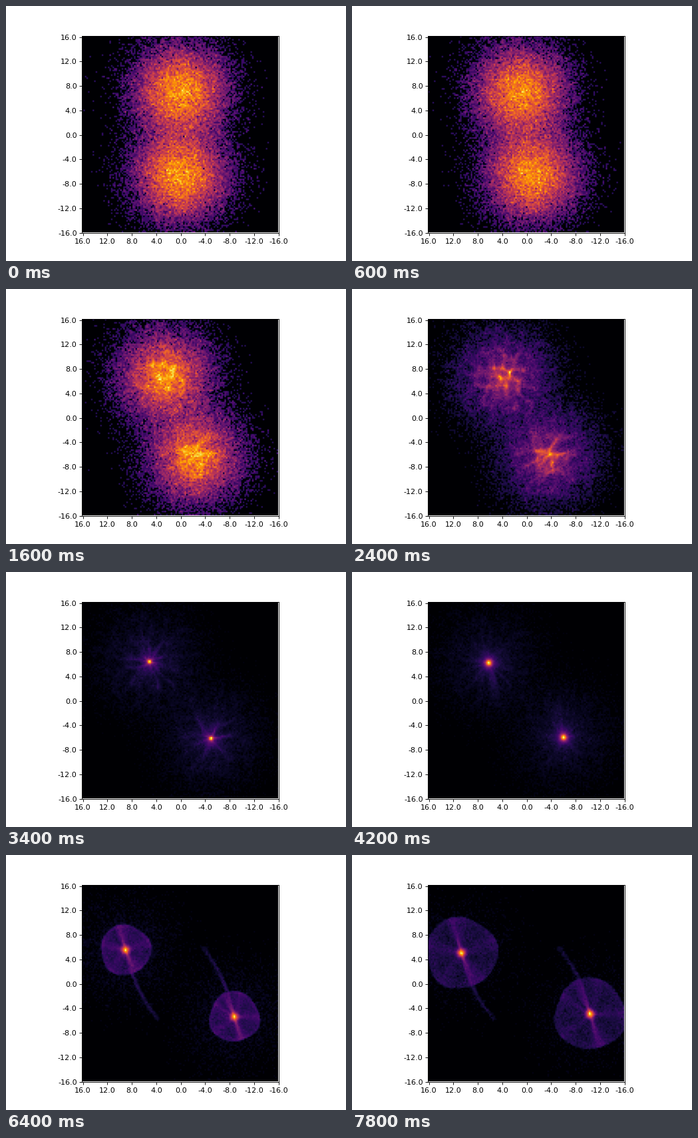
A matplotlib script for the animation above (8 s loop, 511 px wide and 383 px high).

```python
import numpy as np
import matplotlib.pyplot as plt
from matplotlib.animation import FuncAnimation

W, H, DPI = 511, 383, 80
FRAMES, STEP = 40, 200
CELLS, HALF = 128, 16.0
CELL = 2 * HALF / CELLS
COUNT = 25000
CORE, DISC, EDGE, BAR, STREAM = range(5)


def smooth(t, a, b):
    u = np.clip((t - a) / (b - a), 0, 1)
    return u * u * (3 - 2 * u)


class Cloud:
    """Gaussian cloud that falls in on itself and rebounds as a disc."""

    def __init__(self, seed, sign, scale, drift):
        rng = np.random.default_rng(seed)
        self.sign, self.scale, self.drift = sign, scale, drift
        self.q = rng.normal(0, 3.9, (COUNT, 2))
        r0 = np.hypot(*self.q.T)
        self.fall = 2.9 + 0.18 * r0 + 0.09 * np.maximum(r0 - 2.5, 0) ** 2

        # Small waves that gather the particles into filaments
        self.web = np.zeros((COUNT, 2))
        for _ in range(12):
            angle, phase = rng.uniform(0, 2 * np.pi, 2)
            k = 2 * np.pi / rng.uniform(1.5, 4.0)
            n = np.array([np.cos(angle), np.sin(angle)])
            self.web += 0.19 / k * np.sin(k * self.q @ n + phase)[:, None] * n
        self.web *= np.exp(-r0 ** 2 / 80)[:, None]
        self.phase = rng.uniform(0, 2 * np.pi)
        self.wave = self.phase + 0.7 * np.sin(r0)
        self.spoke = (rng.random(COUNT) < 0.4) * np.exp(-(r0 / 7) ** 4)

        self.kind = rng.choice(5, COUNT, p=[0.23, 0.51, 0.08, 0.125, 0.055])
        self.noise = rng.normal(0, 1, (COUNT, 2))
        self.u = rng.random(COUNT)
        self.reach = np.sqrt(self.u)
        self.edge = self.kind == EDGE
        bar = self.kind == BAR
        self.reach[bar] = self.u[bar]
        theta = rng.uniform(-np.pi, np.pi, COUNT)
        theta += 0.07 * np.sin(5 * theta + self.phase)
        arms = np.radians([106, -67, 176, 3])
        arm = rng.choice(arms, COUNT, p=[0.45, 0.45, 0.05, 0.05])
        theta[bar] = (arm + 0.1 * self.noise[:, 0])[bar]
        self.dir = np.stack([np.cos(theta), np.sin(theta)], 1)
        self.rim = (1 + 0.04 * np.sin(3 * theta + self.phase)
                    + 0.015 * np.sin(5 * theta))

    def centre(self, t):
        y0, a, b = self.drift
        x = self.scale * (1.6 * t - 0.03 * t * t)
        return np.array([-x, y0 - a * t - b * t * t])

    def infall(self, t):
        q = self.q + min((t / 2.4) ** 2.5, 1.5) * self.web
        r, th = np.hypot(*q.T), np.arctan2(q[:, 1], q[:, 0])
        pull = 0.92 * smooth(t, 1.8, 3.4) * self.spoke
        th = th - pull * np.sin(6 * th + self.wave) / 6
        left = np.clip(1 - (t / self.fall) ** 2.5, 0, 1) ** 0.7
        return (r * left)[:, None] * np.stack([np.cos(th), np.sin(th)], 1)

    def rebound(self, t):
        radius = 1.95 * max(t - 3.9, 0) ** 0.8
        ramp = np.clip((t - self.fall) / 0.6, 0, 1)
        blur = 0.03 + 0.035 * max(t - 5.2, 0)
        reach = np.where(self.edge, 1 - blur * np.abs(self.noise[:, 1]),
                         self.reach)
        out = (radius * reach * ramp * self.rim)[:, None] * self.dir
        spread = (0.15 + 1.6 * self.u ** 3) * (1 - smooth(t, 4, 5))
        out += spread[:, None] * self.noise
        core = (0.17 + 0.21 * smooth(t, 3.5, 4.8)) * self.noise
        return np.where((self.kind == CORE)[:, None], core, out)

    def stream(self, t, centre):
        tip = np.array([-3.5 - 1.1 * max(t - 6.2, 0), -5.8]) - centre
        bend = np.array([1.2, -6.2])
        s = (self.u ** (1.2 + 0.6 * max(t - 4.8, 0)))[:, None]
        path = 2 * s * (1 - s) * bend + s * s * tip
        return path + (0.1 + 0.12 * s) * self.noise

    def at(self, t):
        centre = self.centre(t)
        p = self.infall(t)
        done = (t >= self.fall)[:, None]
        p = np.where(done, self.rebound(t), p)
        m = smooth(t, 3.4, 5.0)
        if m > 0:
            tail = self.kind == STREAM
            p[tail] += m * (self.stream(t, centre)[tail] - p[tail])
        return self.sign * (p + centre)


clouds = [Cloud(4, 1, 1.0, (7.0, 0.12, 0.0165)),
          Cloud(11, -1, 0.97, (6.55, 0.07, 0.018))]


def density(i):
    p = np.concatenate([c.at(i * STEP / 1000) for c in clouds])
    span = (-HALF - CELL / 2, HALF - CELL / 2)
    n, _, _ = np.histogram2d(-p[:, 1], p[:, 0], bins=CELLS, range=[span, span])
    return np.sqrt(n / n.max())


fig, ax = plt.subplots(figsize=(W / DPI, H / DPI), dpi=DPI)
# Default margins of a figure a fraction of a pixel larger than the stage
kx, ky = (W + 0.49) / W, (H + 0.62) / H
fig.subplots_adjust(left=0.125 * kx, right=0.9 * kx,
                    bottom=0.11 * ky, top=0.88 * ky)
image = ax.imshow(density(0), cmap="inferno", vmin=0, vmax=1)
ticks = np.arange(0, CELLS + 1, 16)
labels = [str(HALF - k * CELL) for k in ticks]
ax.set_xticks(ticks, labels)
ax.set_yticks(ticks, labels)
ax.set_xlim(-0.5, CELLS)
ax.set_ylim(CELLS, -0.5)


def update(i):
    image.set_data(density(i))
    return [image]


def reset():
    return update(0)


anim = FuncAnimation(fig, update, frames=FRAMES, init_func=reset,
                     interval=STEP, repeat=True, repeat_delay=0)
plt.show()
```
